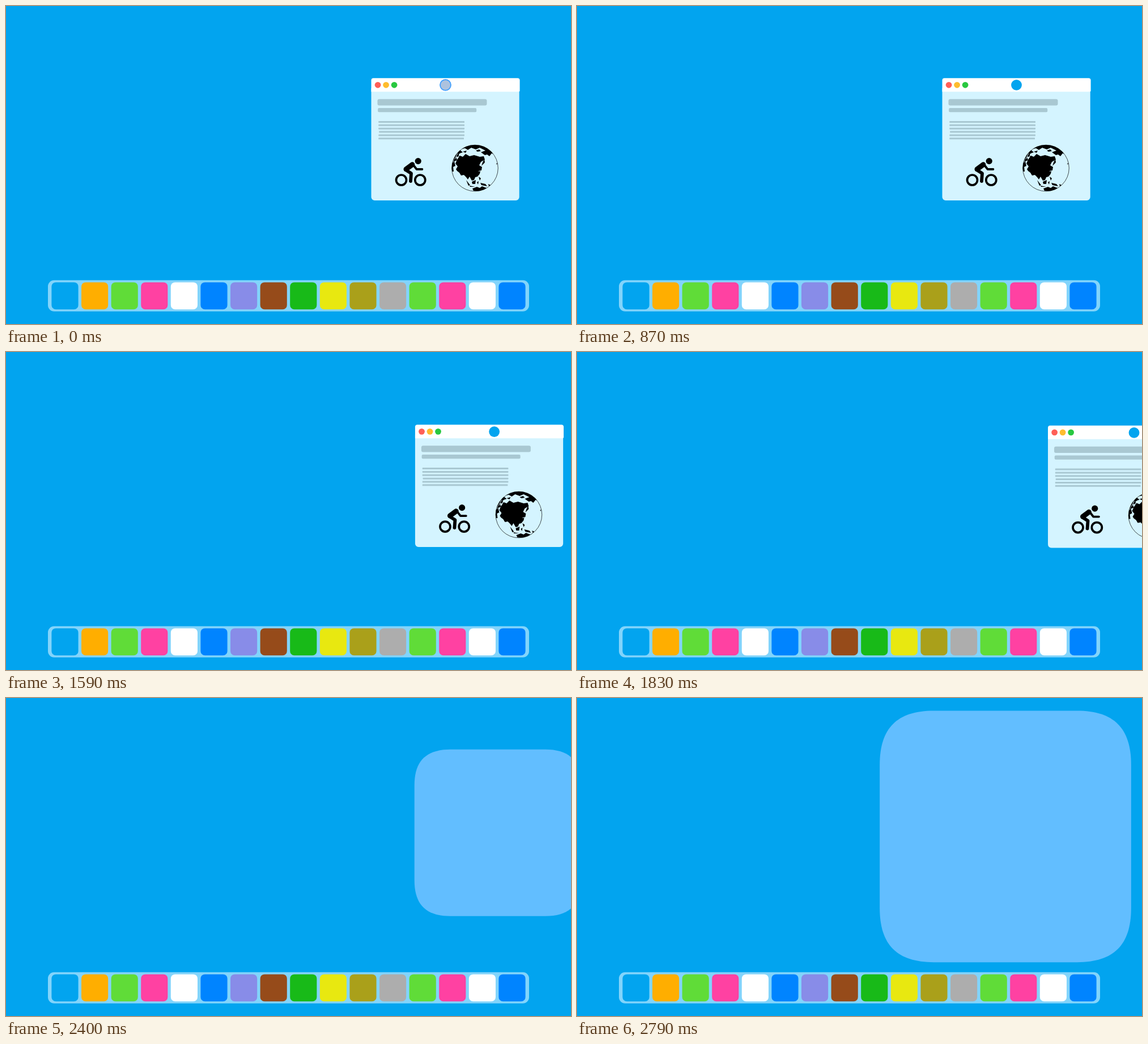
An HTML page for the animation above (3.18 s loop, 997 by 561 pixels).

```html
<!DOCTYPE html>
<html lang="en">
<head>
<meta charset="utf-8">
<title>Window and tile</title>
<style>
html, body { margin: 0; width: 100%; height: 100%; overflow: hidden; background: #02a4ef; }
svg { display: block; width: 100%; height: 100%; }
</style>
</head>
<body>
<svg viewBox="0 0 997 561" preserveAspectRatio="none">
  <rect width="997" height="561" fill="#02a4ef"/>
  <g id="win">
    <path d="M644.5 145H905.7V337a6 6 0 0 1-6 6H650.5a6 6 0 0 1-6-6Z" fill="#d4f4ff"/>
    <path d="M644.5 151.3V131.2a4 4 0 0 1 4-4H902.6a4 4 0 0 1 4 4V149.3a2 2 0 0 1-2 2Z" fill="#fff"/>
    <circle cx="656.1" cy="139.3" r="5.4" fill="#ff5f57"/>
    <circle cx="670.6" cy="139.3" r="5.4" fill="#febc2e"/>
    <circle cx="685.1" cy="139.3" r="5.4" fill="#28c840"/>
    <g id="bars" fill="#a9c8d2">
      <rect x="655.5" y="164.2" width="193" height="11.2" rx="3"/>
      <rect x="656.2" y="180" width="174" height="7.3" rx="2"/>
    </g>
    <g fill="none" stroke="#000" stroke-linecap="round" stroke-linejoin="round">
      <circle cx="697.5" cy="307" r="9" stroke-width="3.7"/>
      <circle cx="730.8" cy="307" r="9" stroke-width="3.7"/>
      <path d="M706 287.8 716.8 279.8" stroke-width="9"/>
      <path d="M705.5 289.3 715 295.2 714 309" stroke-width="5.8"/>
      <path d="M718 279.5 724.6 288H734.4" stroke-width="3.8"/>
      <circle cx="727.2" cy="273.6" r="5.6" fill="#000" stroke="none"/>
    </g>
    <clipPath id="disc"><circle cx="827.5" cy="286" r="41"/></clipPath>
    <g clip-path="url(#disc)">
      <path d="M796 271 801 264 806 266 811 261 818 265 826 263 836 266 843 265 845 271 838 275 835 281 840 284 839 290 834 291 836 296 832 301 828 302 826 307 822 308 818 301 815 306 812 302 808 298 803 299 800 294 796 291 794 288 797 283 793 278Z"/>
      <path d="M786 292V262L797 251 805 249 801 254 806 258 799 261 800 266 794 266 796 272 791 274 793 282 789 284 790 292Z"/>
      <path d="M803 252 813 246 826 244 842 245 856 252 864 262 857 260 853 265 849 262 845 263 838 258 846 255 836 250 829 253 821 250 815 254 810 251Z"/>
      <path d="M806 257 813 255 811 259ZM829 255 835 253 838 256 832 257ZM841 276 844 270 845 276 839 282ZM833 293 837 291 836 296ZM834 301 838 304 836 308ZM812 307 819 316 816 317ZM822 310 829 307 828 314 823 314ZM831 311 834 309 833 315ZM818 317 828 319 819 319ZM837 312 846 314 849 318 839 316ZM851 314 855 316 852 318ZM865 278 867 277 866 280Z"/>
      <path d="M823 322 831 319 836 321 840 318 848 321 845 326 834 327 825 326Z"/>
      <path d="M797 260 792 270M803 259 797 267M791 264 789 276" stroke="#d4f4ff"/>
    </g>
    <circle cx="827.5" cy="286" r="40.8" fill="none" stroke="#000" stroke-width=".7"/>
  </g>
  <g id="dot">
    <circle cx="775.5" cy="139.3" r="9.4" fill="#02a4ef"/>
    <circle id="press" cx="775.5" cy="139.3" r="9.5" fill="#adc2de" stroke="#3f9fff" stroke-width="1.8"/>
  </g>
  <path id="tile" fill="#62beff"/>
  <g id="dock">
    <rect x="74" y="483.8" width="849" height="55" rx="11" fill="#82d4fb"/>
  </g>
</svg>
<script>
const LOOP = 3180, STEP = 30;
const $ = id => document.getElementById(id);
const win = $('win'), dot = $('dot'), press = $('press'), tile = $('tile');

function addRect(parent, attrs) {
  const r = document.createElementNS('http://www.w3.org/2000/svg', 'rect');
  for (const k in attrs) r.setAttribute(k, attrs[k]);
  parent.appendChild(r);
}

const colors = ['#02a4ef', '#ffae00', '#60dc38', '#ff41a2', '#fff', '#0084ff', '#888ce8', '#964b1a',
  '#18ba18', '#e8e810', '#aaa01a', '#adadad', '#60dc38', '#ff41a2', '#fff', '#0084ff'];
colors.forEach((fill, i) =>
  addRect($('dock'), { x: 80.4 + i * 52.6, y: 487.4, width: 47.2, height: 47.8, rx: 7.5, fill }));

for (let i = 0; i < 6; i++) {
  const x = i === 3 ? 658.2 : 657.3, end = i === 5 ? 808 : 809;
  addRect($('bars'), { x, y: 203 + i * 5.86, width: end - x, height: 3, rx: .6 });
}

const clamp = p => Math.min(1, Math.max(0, p));
const mix = (a, b, p) => a + (b - a) * p;

// cubic-bezier(.42, 0, .58, 1)
function ease(p) {
  p = clamp(p);
  let lo = 0, hi = 1;
  for (let i = 0; i < 24; i++) {
    const s = (lo + hi) / 2, q = 1 - s;
    if (1.26 * s * q * q + 1.74 * s * s * q + s * s * s < p) lo = s; else hi = s;
  }
  return lo * lo * (3 - 2 * lo);
}

// Square with continuous corners
function squircle(x, y, s) {
  const e = s * .215, c = s * .069, r = x + s, b = y + s;
  return `M${x} ${y + e}C${x} ${y + c} ${x + c} ${y} ${x + e} ${y}H${r - e}` +
    `C${r - c} ${y} ${r} ${y + c} ${r} ${y + e}V${b - e}` +
    `C${r} ${b - c} ${r - c} ${b} ${r - e} ${b}H${x + e}` +
    `C${x + c} ${b} ${x} ${b - c} ${x} ${b - e}Z`;
}

function draw(t) {
  press.setAttribute('opacity', clamp(1 - t / 870));

  const m = ease((t - 1350) / 540);
  win.setAttribute('transform', `translate(${191.2 * m} ${2.6 * m})`);
  dot.setAttribute('transform', `translate(${212.7 * m} ${3.2 * m})`);

  // The window is dropped once the tile covers it
  const shown = t < 2400 ? 'visible' : 'hidden';
  win.setAttribute('visibility', shown);
  dot.setAttribute('visibility', shown);

  const g = ease((t - 1890) / 900), size = mix(56, 443.6, g);
  tile.setAttribute('d', squircle(mix(1017, 534.2, g), mix(227.3, 244.4, g) - size / 2, size));
}

function tick(now) {
  draw(Math.floor(now % LOOP / STEP) * STEP);
  requestAnimationFrame(tick);
}
draw(0);
requestAnimationFrame(tick);
</script>
</body>
</html>
```
